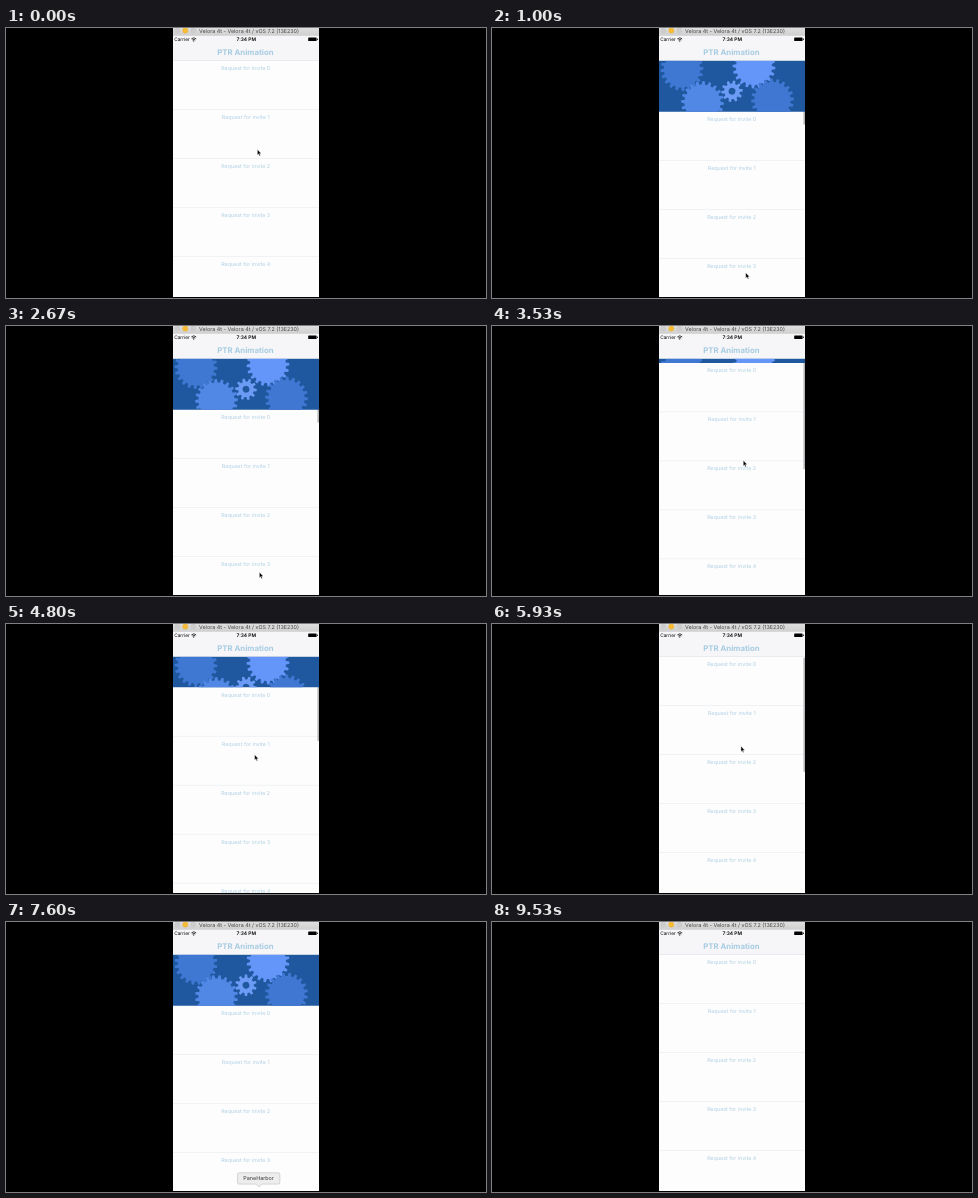
Write an HTML page that moves like this. It is 480 px wide and 270 px high and loops after 9740 ms.

```html
<!DOCTYPE html>
<html lang="en">
<head>
<meta charset="utf-8">
<title>Pull to refresh</title>
<style>
  html, body { margin: 0; width: 100%; height: 100%; overflow: hidden; background: #000; }
  svg { display: block; width: 100vw; height: 100vh; }
  text { font-family: Inter, Roboto, sans-serif; text-anchor: middle; text-rendering: geometricPrecision; }
  .row { font-size: 5.35px; fill: #afd0e4; }
  .nav { font-size: 7.8px; font-weight: 700; fill: #a6cce2; }
</style>
</head>
<body>
<svg viewBox="0 0 480 270">
  <defs>
    <clipPath id="screen"><rect x="167" width="146" height="269"/></clipPath>
    <clipPath id="reveal"><rect id="slot" x="167" y="32.4" width="146" height="0"/></clipPath>
    <linearGradient id="chrome" x2="0" y2="1">
      <stop offset="0" stop-color="#dedede"/><stop offset="1" stop-color="#d0d0d0"/>
    </linearGradient>
  </defs>
  <rect width="480" height="270"/>
  <g clip-path="url(#screen)">
    <rect x="167" width="146" height="270" fill="#fdfdfd"/>
    <g id="rows"></g>
    <rect id="bar" x="311.5" y="33.6" width="1.4" rx=".7" fill="#acacb2"/>
    <g clip-path="url(#reveal)">
      <rect x="167" y="32" width="146" height="70" fill="#1f589f"/>
      <g id="gears"></g>
    </g>
    <rect x="167" y="7" width="146" height="25.4" fill="#f6f5f8"/>
    <rect x="167" y="32" width="146" height=".5" fill="#d5dce2"/>
    <text class="nav" x="239.4" y="26.5">PTR Animation</text>
    <text x="176" y="13.1" font-size="4.8">Carrier</text>
    <g fill="none" stroke="#111" stroke-width=".8">
      <path d="M185.4 10.9Q187.8 8.7 190.2 10.9M186.3 12Q187.8 10.7 189.3 12"/>
      <circle cx="187.8" cy="13" r=".3"/>
    </g>
    <text x="240.3" y="13.1" font-size="4.9" font-weight="600">7:34 PM</text>
    <rect x="302.2" y="9.5" width="8.4" height="3.6" rx=".6"/>
    <rect x="311" y="10.5" width=".8" height="1.6" rx=".3"/>
    <rect x="167" width="146" height="7.2" fill="url(#chrome)"/>
    <rect x="167" y="7" width="146" height=".4" fill="#b5b5b5"/>
    <g stroke-width=".3">
      <circle cx="171.3" cy="2.6" r="2.5" fill="#cdcdcd" stroke="#bcbcbc"/>
      <circle cx="179.3" cy="2.6" r="2.7" fill="#f8bd35" stroke="#dda42d"/>
      <circle cx="187.3" cy="2.6" r="2.5" fill="#cdcdcd" stroke="#bcbcbc"/>
    </g>
    <text x="243" y="4.7" font-size="5.4" fill="#444">Velora 4t - Velora 4t / vOS 7.2 (13E230)</text>
    <g id="tip">
      <path d="M233.2 250.8H272.2Q273.9 250.8 273.9 252.5V260.4Q273.9 262.1 272.2 262.1H255.8L253 265L250.2 262.1H233.2Q231.5 262.1 231.5 260.4V252.5Q231.5 250.8 233.2 250.8Z"
        fill="#ededed" stroke="#bcbcbc" stroke-width=".6"/>
      <text x="252.6" y="258.2" font-size="5.4" fill="#333">PaneHarbor</text>
    </g>
    <path id="cursor" d="M-1.6-3.2V2.2L-.4 1.1L.5 3.1L1.4 2.7L.5 .8H2.2Z"
      fill="#000" stroke="#fff" stroke-width=".35"/>
  </g>
</svg>
<script>
const LOOP = 9740, TOP = 32.4, PITCH = 49;
const PEAK = 58, REST = 51.3;            // pulled offset, refreshing offset
const DRAG = 640, SETTLE = 200, FALL = 350;
const $ = id => document.getElementById(id);
const clamp = p => Math.min(1, Math.max(0, p));
const ease = p => (p = clamp(p)) * p * (3 - 2 * p);

function add(parent, tag, attrs, text) {
  const el = document.createElementNS("http://www.w3.org/2000/svg", tag);
  for (const k in attrs) el.setAttribute(k, attrs[k]);
  if (text) el.textContent = text;
  parent.appendChild(el);
  return el;
}

for (let i = 0; i < 5; i++) {
  const y = TOP + i * PITCH;
  add($("rows"), "text", { class: "row", x: 239.7, y: y + 9.4 }, "Request for invite " + i);
  add($("rows"), "rect", { x: 167, y: y + PITCH - .4, width: 146, height: .5, fill: "#e3e6e8" });
}

function gearPath(teeth, root, outer, hole) {
  const step = 2 * Math.PI / teeth, pts = [];
  const put = (r, a) => pts.push((r * Math.cos(a)).toFixed(2) + " " + (r * Math.sin(a)).toFixed(2));
  for (let i = 0; i < teeth; i++) {
    const a = i * step;
    put(root, a - step * .32);
    put(outer, a - step * .17);
    put(outer, a + step * .17);
    put(root, a + step * .32);
  }
  const ring = hole ? `M${hole} 0A${hole} ${hole} 0 1 0 ${-hole} 0A${hole} ${hole} 0 1 0 ${hole} 0Z` : "";
  return "M" + pts.join("L") + "Z" + ring;
}

const big = gearPath(20, 18, 21.4), small = gearPath(10, 7.8, 10.8, 3.4);
const gears = [
  { x: 190, y: 41.5, color: "#3f78d3", dir: 1, path: big },
  { x: 262, y: 39, color: "#6495f8", dir: -1, path: big },
  { x: 210.5, y: 74.5, color: "#5187e5", dir: -1, path: big },
  { x: 280.5, y: 72, color: "#3f77d2", dir: 1, path: big },
  { x: 240, y: 63.3, color: "#6b9bf4", dir: 2, path: small }
];
for (const g of gears)
  g.el = add($("gears"), "path", { d: g.path, fill: g.color, "fill-rule": "evenodd" });

// The last pull ends with the pointer leaving for the dock
const pulls = [
  { from: 100, to: 1700 },
  { from: 1765, to: 3080 },
  { from: 3420, to: 5000 },
  { from: 5940, to: 8950, leaves: true }
];

function offset(t) {
  return pulls.reduce((sum, p) => {
    const u = t - p.from;
    const out = PEAK * ease(u / DRAG) - (PEAK - REST) * ease((u - DRAG - 60) / SETTLE);
    return sum + out * (1 - ease((t - p.to + FALL) / FALL));
  }, 0);
}

function pointer(t) {
  const drift = t / 7000 * 2 * Math.PI;
  let y = 126.3 - 1.5 * Math.cos(drift);
  for (const p of pulls) {
    const u = t - p.from;
    y += p.leaves ? 115 * ease(u / DRAG) + 45 * ease((u - 960) / 350)
                  : 125 * ease(u / DRAG) * (1 - ease((u - 850) / 620));
  }
  return `translate(${253 + 3 * Math.sin(drift)} ${y})`;
}

// The gears stall briefly during the last refresh
const stalled = t => Math.max(Math.min(t, 7600), t - 270);

function draw(t) {
  const dy = offset(t), turn = stalled(t) * .1 + dy * .8;
  $("rows").setAttribute("transform", `translate(0 ${dy})`);
  $("slot").setAttribute("height", dy);
  for (const g of gears)
    g.el.setAttribute("transform", `translate(${g.x} ${g.y}) rotate(${turn * g.dir})`);
  $("bar").setAttribute("height", 114.4 - dy);
  $("bar").setAttribute("opacity", clamp((t - 70) / 70) - clamp((t - 7050) / 250));
  $("cursor").setAttribute("transform", pointer(t));
  $("tip").setAttribute("visibility", t >= 7400 && t < 7930 ? "visible" : "hidden");
}

const start = performance.now();
function tick() {
  draw((performance.now() - start) % LOOP);
  requestAnimationFrame(tick);
}
tick();
</script>
</body>
</html>
```
